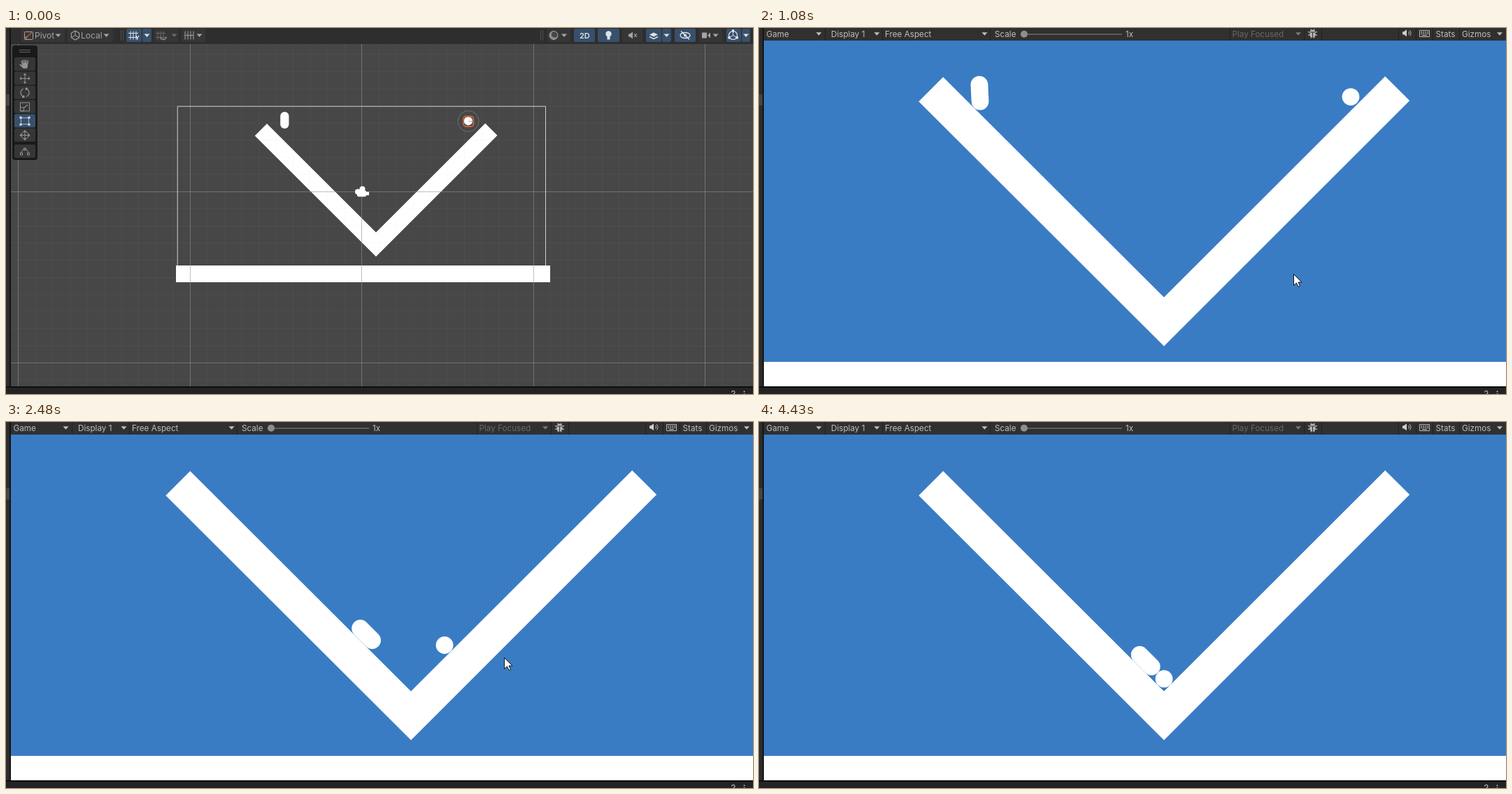
Animation, 1068 px wide and 524 px high, one loop 4500 ms. Source, as an HTML page with a canvas:

```html
<!DOCTYPE html>
<html lang="en">
<head>
<meta charset="utf-8">
<title>Slope physics</title>
<style>
html, body { margin: 0; width: 100%; height: 100%; overflow: hidden; background: #232323; }
canvas { display: block; width: 1068px; height: 524px; }
</style>
</head>
<body>
<canvas id="stage" width="1068" height="524"></canvas>
<script>
const ctx = document.getElementById('stage').getContext('2d');
const LOOP = 4500, W = 1068, H = 524, TAU = Math.PI * 2;
const TEXT = '#bebebe', ICON = '#a4a4a4', BRIGHT = '#dde2e7', DIM = '#696969';
const BUTTON = '#363636', ACTIVE = '#38506b';

// ---- Drawing helpers ----

function rect(x, y, w, h, color) {
  ctx.fillStyle = color;
  ctx.fillRect(x, y, w, h);
}

function box(x, y, w, h, r, color) {
  ctx.fillStyle = color;
  ctx.beginPath();
  ctx.roundRect(x, y, w, h, r);
  ctx.fill();
}

function frameBox(x, y, w, h, r, color = ICON, width = 1) {
  ctx.strokeStyle = color;
  ctx.lineWidth = width;
  ctx.beginPath();
  ctx.roundRect(x, y, w, h, r);
  ctx.stroke();
}

function trace(points) {
  ctx.beginPath();
  for (const [x, y] of points) ctx.lineTo(x, y);
}

function poly(points, color) {
  trace(points);
  ctx.fillStyle = color;
  ctx.fill();
}

function line(points, color = ICON, width = 1) {
  trace(points);
  ctx.strokeStyle = color;
  ctx.lineWidth = width;
  ctx.stroke();
}

function disc(x, y, r, color) {
  ctx.fillStyle = color;
  ctx.beginPath();
  ctx.arc(x, y, r, 0, TAU);
  ctx.fill();
}

function arc(x, y, r, color = ICON, width = 1, from = 0, to = TAU) {
  ctx.strokeStyle = color;
  ctx.lineWidth = width;
  ctx.beginPath();
  ctx.arc(x, y, r, from, to);
  ctx.stroke();
}

function label(text, x, y, size = 11.7, color = TEXT, weight = 400) {
  ctx.font = `${weight} ${size}px Inter, Roboto, sans-serif`;
  ctx.fillStyle = color;
  ctx.fillText(text, x, y);
}

function at(x, y, draw, color) {
  ctx.save();
  ctx.translate(x, y);
  draw(color);
  ctx.restore();
}

const polar = (r, a) => [r * Math.cos(a), r * Math.sin(a)];
const ring = (n, r, turn = 0) => Array.from({ length: n }, (_, i) => polar(r, turn + i * TAU / n));
const down = (color = ICON) => poly([[-4, -2], [4, -2], [0, 2.5]], color);

// ---- Icons, each centred on its own origin ----

function hand(c) {
  box(-4, -2, 8, 8, 3, c);
  for (let i = -1.5; i < 2; i++) line([[i * 2.3, 0], [i * 2.9, Math.abs(i) - 7]], c, 1.7);
  line([[-3, 4], [-7, 0]], c, 1.8);
}

function move(c) {
  for (const [x, y] of ring(4, 1)) {
    line([[0, 0], [x * 6, y * 6]], c);
    poly([[x * 7.5, y * 7.5], [x * 5 - y * 2.5, y * 5 + x * 2.5], [x * 5 + y * 2.5, y * 5 - x * 2.5]], c);
  }
}

function turn(c) {
  for (const start of [-1.2, -1.2 + Math.PI]) {
    arc(0, 0, 6, c, 1.2, start, start + 2.4);
    disc(...polar(6, start), 1.8, c);
  }
}

function resize(c) {
  frameBox(-6.5, -6, 13, 12, 0, c);
  frameBox(-6.5, 1, 5, 5, 0, c);
  line([[-1, 1], [4, -3]], c, 1.3);
}

function corners(c) {
  frameBox(-5.5, -4.5, 11, 9, 0, c);
  for (const x of [-6, 6]) for (const y of [-5, 5]) rect(x - 1.5, y - 1.5, 3, 3, BRIGHT);
}

function moveAll(c) {
  arc(0, 0, 5, c);
  move(c);
}

function nodes(c) {
  arc(0, 2, 5, c, 1, Math.PI, TAU);
  for (const x of [-5, 0, 5]) frameBox(x - 1.5, x ? 2 : -5, 3, 3, 0, c);
}

function pivot(c) {
  frameBox(-6.5, -5, 12, 11, 1, c);
  line([[-5, 4], [4, -4]], '#b5603c', 1.3);
  disc(-4.5, 3.5, 2, '#b5603c');
}

function cube(c) {
  const rim = ring(6, 6.5, Math.PI / 6);
  line([...rim, rim[0]], c, 1.1);
  for (const i of [0, 2, 4]) line([[0, 0], rim[i]], c);
}

function hash(c) {
  for (const d of [-4, 0, 4]) {
    line([[d, -6], [d, 6]], c);
    if (d) line([[-7, d * .75], [7, d * .75]], c);
  }
}

function gridAxis(c) {
  hash(c);
  label('Y', 3, 6, 8, '#fff', 600);
}

function magnet(c) {
  hash(c);
  arc(4, 2, 4, '#808080', 2, 0, Math.PI);
}

function ruler(c) {
  for (const x of [-6, -2, 2, 6]) line([[x, -6], [x, 6]], c);
  line([[-6, 0], [6, 0]], c);
}

function shading(c) {
  disc(0, 0, 6, '#888');
  disc(1.5, -1.5, 4.6, '#484848');
  arc(0, 0, 6, c);
}

function bulb(c) {
  disc(0, -2, 4.2, c);
  rect(-2, 1, 4, 5, c);
}

function speaker(c) {
  rect(-6, -2, 3, 4, c);
  poly([[-4, -2], [0, -5], [0, 5], [-4, 2]], c);
}

function muted(c) {
  speaker(c);
  for (const s of [-2.5, 2.5]) line([[2, -s], [6, s]], c, 1.2);
}

function layers(c) {
  poly([[-6, -1], [0, -4], [6, -1], [0, 2]], c);
  line([[-6, 2], [0, 5], [6, 2]], c, 1.5);
}

function hiddenEye(c) {
  ctx.beginPath();
  ctx.ellipse(0, 0, 7, 4, 0, 0, TAU);
  ctx.strokeStyle = c;
  ctx.lineWidth = 1.4;
  ctx.stroke();
  disc(0, 0, 2, c);
  line([[-6, -6], [6, 6]], c, 1.5);
}

function camera(c) {
  rect(-6, -4, 7, 8, c);
  poly([[2, 0], [6, -4], [6, 4]], c);
}

function globe(c) {
  arc(0, 0, 6, c, 1.2);
  for (const p of ring(3, 6.5, -Math.PI / 2)) {
    line([[0, 0], p], c);
    disc(...p, 1.9, c);
  }
}

function bug(c) {
  box(-4, -5.5, 8, 11, 4, c);
  for (const [x, y] of ring(8, 7, Math.PI / 8)) line([[x / 2, y / 2], [x, y]], c, 1.2);
  line([[-4, -2], [4, -2]], '#303030');
  line([[0, -2], [0, 5]], '#303030');
}

function keyboard(c) {
  frameBox(-7, -4.5, 14, 9, 0, c);
  for (let i = 0; i < 8; i++) rect(-5 + i % 4 * 3, i < 4 ? -3 : -.5, 1.6, 1.6, c);
  rect(-3.5, 2, 7, 1.2, c);
}

// ---- Shared scene ----

const VERTEX = [579, 420.5];

function capsule({ x, y, angle }) {
  const dx = 12 * Math.sin(angle), dy = 12 * Math.cos(angle);
  ctx.lineCap = 'round';
  line([[x - dx, y - dy], [x + dx, y + dy]], '#fff', 24.8);
  ctx.lineCap = 'butt';
}

function bodies(t) {
  const [x, y] = VERTEX, arm = 333.2;
  line([[x - arm, y - arm + .5], VERTEX, [x + arm + .5, y - arm - .7]], '#fff', 49.4);
  const cap = capsulePose(t);
  capsule(cap);
  disc(...ballPos(t, cap), 12.4, '#fff');
}

function windowEdges() {
  rect(0, 0, 5, H, '#2c2c2c');
  rect(0, 95, 5, 16, '#454545');
  rect(5, 0, 2, 514, '#151515');
  rect(0, 513, W, 2, '#0e0e0e');
  rect(0, 515, W, 9, '#232323');
  label('?', 1036.5, 528.5, 13);
  for (const y of [520.5, 524]) disc(1055.5, y, 1, TEXT);
}

// ---- Editor view ----

function grid() {
  const step = 24.54;
  for (let i = -20; i <= 23; i++) {
    const color = i % 10 ? 'rgba(160,160,160,.06)' : 'rgba(145,145,145,.6)';
    rect(Math.floor(508.6 + i * step), 23, 1, 490, color);
    rect(7, Math.floor(234.3 + i * step), W, 1, color);
  }
}

function toolPanel() {
  box(9, 25, 36, 164, 4, '#191919');
  for (const y of [31, 34]) rect(19, y, 16, 1, '#666');
  [hand, move, turn, resize, corners, moveAll, nodes].forEach((icon, i) => {
    const y = 52 + i * 20.3 + (icon === nodes ? 3 : 0), on = icon === corners;
    box(12, y - 10, 30, 19.3, 2, on ? ACTIVE : BUTTON);
    at(27, y, icon, on ? '#a9b9ca' : '#949494');
  });
}

function button(x, w, icon, iconX, color = ICON) {
  box(x, 1, w, 19, 2, color === BRIGHT ? ACTIVE : BUTTON);
  at(iconX, 10.5, icon, color);
}

function editorBar() {
  rect(7, 0, W, 23, '#2e2e2e');
  for (const x of [164, 167, 764, 767]) rect(x, 3, 1, 15, '#505050');
  button(22, 62, pivot, 33);
  button(88, 65, cube, 99);
  button(172, 22, gridAxis, 182, BRIGHT);
  button(195, 13, down, 201.5, BRIGHT);
  button(212, 34, magnet, 221, DIM);
  button(251, 34, ruler, 262);
  button(774, 33, shading, 783);
  button(812, 30, () => label('2D', -7, 4, 11, BRIGHT, 600), 827, BRIGHT);
  button(846, 31, bulb, 861.5, BRIGHT);
  button(881, 29, muted, 896);
  button(915, 22, layers, 926, BRIGHT);
  button(938, 13, down, 944.5, BRIGHT);
  button(956, 30, hiddenEye, 971, BRIGHT);
  button(991, 33, camera, 1001);
  button(1030, 21, globe, 1039.5, BRIGHT);
  button(1052, 12, down, 1058, BRIGHT);
  for (const x of [74.5, 143.5, 276.5, 798, 1014.5]) at(x, 10.5, down);
  at(240.5, 10.5, down, DIM);
  label('Pivot', 41, 15, 12, ICON);
  label('Local', 107, 15, 12, ICON);
}

function cameraGizmo() {
  disc(-6, 0, 4, '#fff');
  disc(.5, -4, 4, '#fff');
  box(-7, -2, 13, 9, 2, '#fff');
  rect(5, 0, 5, 5, '#fff');
}

function editorView() {
  rect(0, 0, W, H, '#474747');
  ctx.save();
  ctx.translate(529, 310);
  ctx.scale(.494, .494);
  ctx.translate(-VERTEX[0], -VERTEX[1]);
  bodies(0);
  ctx.restore();
  grid();
  frameBox(245.2, 112.2, 526.3, 240, 0, '#d0d0d0');
  rect(243, 340, 535, 24, '#fff');
  for (const x of [263, 508, 754]) rect(x, 340, 1, 24, '#c0c0c0');
  arc(661, 133.5, 15, '#707070');
  frameBox(654, 126.5, 14.5, 14.5, 4, '#c9663c', 1.8);
  line([[661, 133.5], [667, 133.5]], '#aaa');
  at(509, 234.5, cameraGizmo);
  toolPanel();
  editorBar();
  windowEdges();
}

// ---- Game view ----

function gameBar() {
  rect(7, 0, W, 18, '#303030');
  for (const x of [94, 176, 330, 673, 779, 804, 914, 939, 963, 1001]) rect(x, 0, 1, 18, '#212121');
  label('Game', 10.5, 13);
  label('Display 1', 103, 13);
  label('Free Aspect', 180, 13);
  label('Scale', 337, 13);
  rect(374, 8, 145, 2, '#5c5c5c');
  disc(379, 8.7, 5, '#8e8e8e');
  label('1x', 524, 13);
  label('Play Focused', 676.5, 13, 11.7, DIM);
  label('Stats', 967.5, 13);
  label('Gizmos', 1005, 13);
  for (const x of [85.5, 168.5, 322.5, 1059]) at(x, 8.2, down, TEXT);
  at(771, 8.2, down, '#777');
  at(791.5, 8, bug, '#b5b5b5');
  at(926, 7.3, speaker, '#d0d0d0');
  for (const r of [3, 5.5]) arc(926.5, 7.3, r, TEXT, 1, -.9, .9);
  at(951.5, 8, keyboard, '#b5b5b5');
}

// ---- Motion ----

const LEFT_SLOPE = -211.1;   // y - x of bodies resting on the left arm
const RIGHT_SLOPE = 946.5;   // x + y of bodies resting on the right arm

function travel(t, start, v, a) {
  const s = (t - start) / 1000;
  return v * s + a * s * s / 2;
}

const fall = t => travel(Math.max(t, 695), 695, 0, 487);

function capsulePose(t) {
  if (t < 1053) return { x: 314.5, y: 60.3 + fall(t), angle: 0 };
  if (t < 1570) {
    // The foot slides while the body tips over onto the slope.
    const foot = 314.5 + travel(t, 1053, 58.5, 134);
    const angle = Math.min(Math.PI / 4, travel(t, 1053, 1.6, 8));
    return {
      x: foot - 12 * Math.sin(angle),
      y: foot + LEFT_SLOPE - 12 * Math.cos(angle),
      angle
    };
  }
  const slide = 405.2 + travel(t, 1920, 166, 108);
  const recoil = 530.5 + travel(t, 3070, 0, 290);
  const settle = Math.min(552.8, 530.5 + travel(t, 3070, 0, 86));
  const x = t < 3070 ? Math.min(slide, recoil) : settle;
  return { x, y: x + LEFT_SLOPE, angle: Math.PI / 4 };
}

function ballPos(t, cap) {
  if (t < 1089) return [846, 62.5 + fall(t)];
  if (t < 2670) {
    const x = Math.max(VERTEX[0], 846 - travel(t, 1089, 62.5, 136.5));
    return [x, RIGHT_SLOPE - x];
  }
  return [cap.x + 26.3, cap.y + 26];
}

const mix = (a, b, p) => a + (b - a) * p;

// Progress from 0 to 1; powers above 1 start slowly, below 1 end slowly.
const ease = (t, from, to, power) => Math.min(1, Math.max(0, (t - from) / (to - from))) ** power;

function cursor(t) {
  if (t < 520 || t > 3500) return;
  const enter = ease(t, 520, 940, .8), back = ease(t, 2340, 2480, 1), leave = ease(t, 2690, 3500, 1.35);
  const x = mix(mix(mix(978, 764, enter), 712, back), 955, leave);
  const y = mix(mix(mix(478, 352, enter), 337, back), 525, leave);
  at(x + .5, y + .5, () => {
    const shape = [[0, 0], [0, 16], [4, 12.5], [6.5, 18], [9, 17], [6.5, 11.5], [11.5, 11.5], [0, 0]];
    poly(shape, '#fff');
    line(shape, '#111');
  });
}

function gameView(t) {
  rect(0, 0, W, H, '#3a7cc3');
  rect(7, 478, W, 35, '#fff');
  bodies(t);
  gameBar();
  windowEdges();
  cursor(t);
}

function held(t) {
  if (t < 520) return 190;
  const start = t < 3310 ? 520 : 3310;
  return start + Math.floor((t - start) / 70) * 70;
}

function frame() {
  const t = performance.now() % LOOP;
  if (t < 190) editorView();
  else gameView(held(t));
  requestAnimationFrame(frame);
}
frame();
</script>
</body>
</html>
```
